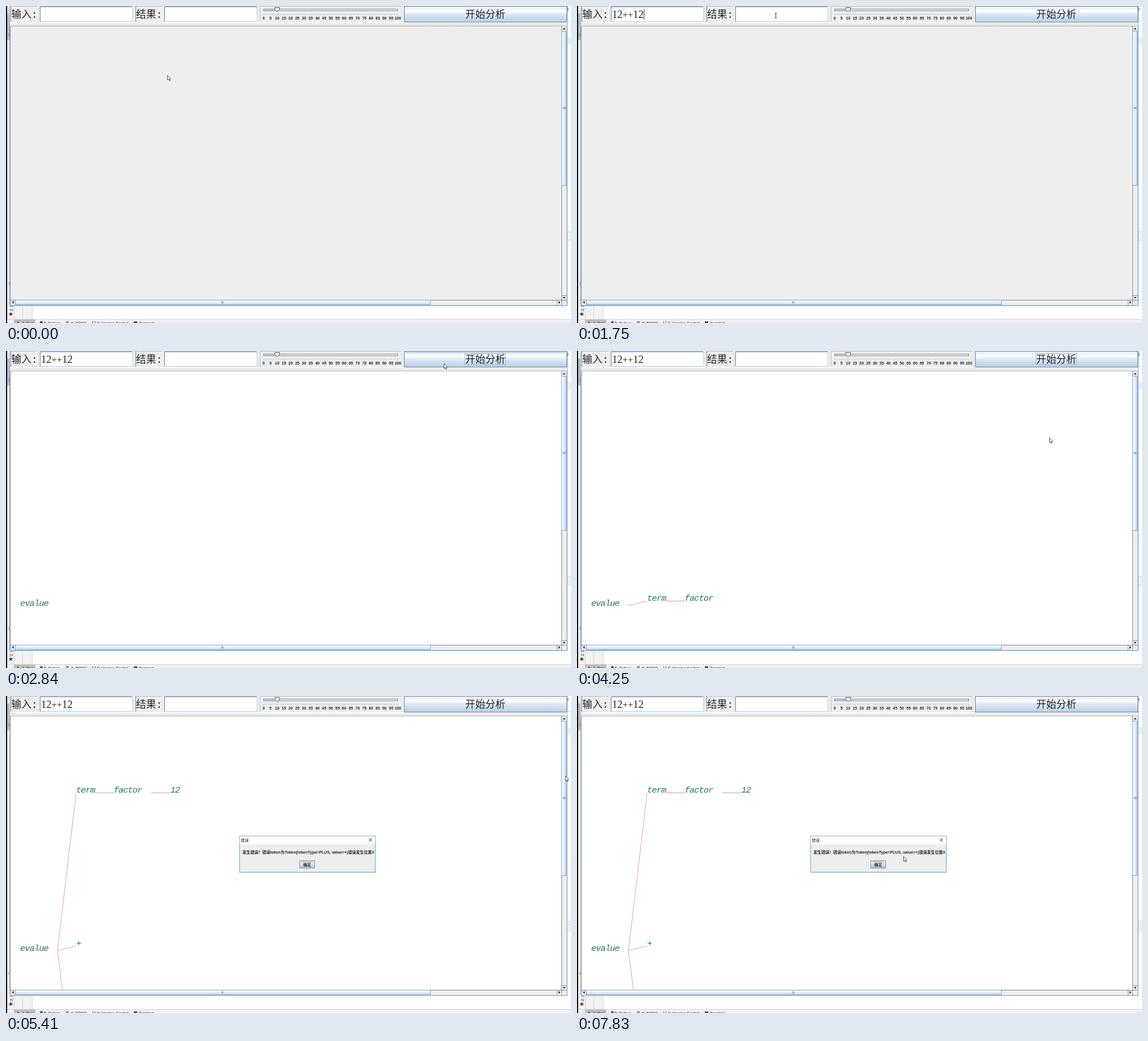
These frames come from a looping animation (999 px wide and 561 px high, 8000 ms). An HTML page:

```html
<!DOCTYPE html>
<html lang="zh">
<head>
<meta charset="utf-8">
<title>表达式分析</title>
<style>
html, body { margin: 0; width: 100%; height: 100%; overflow: hidden; background: #fff; }
svg { display: block; width: 999px; height: 561px; }
text { font-family: "Liberation Sans", "Noto Sans CJK SC", "Noto Sans CJK", sans-serif; fill: #222; white-space: pre; }
.big { font-size: 17.7px; font-family: "Liberation Mono", "Noto Sans CJK SC", "Noto Sans CJK", monospace; }
.entry { font-size: 18.6px; font-family: "Liberation Serif", serif; }
.entry tspan { font-size: 16.5px; }
.small { font-size: 7px; }
.bold { font-weight: bold; }
.mid { text-anchor: middle; }
.node text { font: italic 15.5px "Liberation Mono", monospace; letter-spacing: -1px; fill: #23785f; }
.node path { fill: none; stroke: #e3a28f; stroke-width: 1; }
.node .flat { stroke: #c9a08c; }
.steel { fill: none; stroke: #7a8a99; }
.pale { fill: none; stroke: #b5bec7; }
.thumb { stroke: #86a3d6; }
</style>
</head>
<body>
<svg id="stage" viewBox="0 0 999 561">
  <defs>
    <linearGradient id="btn" x2="0" y2="1">
      <stop offset="0" stop-color="#dde8f3"/><stop offset=".3" stop-color="#fff"/>
      <stop offset=".5" stop-color="#dde8f3"/><stop offset="1" stop-color="#b8cfe5"/>
    </linearGradient>
    <linearGradient id="barV"><stop offset="0" stop-color="#fff"/><stop offset="1" stop-color="#c8dcf0"/></linearGradient>
    <linearGradient id="barH" x2="0" y2="1"><stop offset="0" stop-color="#fff"/><stop offset="1" stop-color="#c8dcf0"/></linearGradient>
    <pattern id="bumps" width="2" height="2" patternUnits="userSpaceOnUse">
      <rect width="2" height="2" fill="#eee"/><rect width="1" height="1" fill="#fff"/>
      <rect x="1" y="1" width="1" height="1" fill="#c4ccd4"/>
    </pattern>
    <clipPath id="view"><rect x="8" y="36" width="974" height="484"/></clipPath>
  </defs>

  <g id="editor">
    <rect width="999" height="561" fill="#fff"/>
    <path d="M2 0H6V13H2ZM2 61H6V531H2Z" fill="#f4f4f4"/>
    <rect x="2" y="13" width="5" height="48" fill="#bdbdbd"/>
    <path d="M5.5 48V54M5.5 489V493" stroke="#777"/>
    <path d="M993 27.5H999M993 399.5H999M993 414.5H999" stroke="#d4d4d4"/>
    <path d="M993 3q2.500 3 0 6" fill="none" stroke="#555"/>
    <rect x="993" y="55" width="6" height="13" fill="#e3effb"/>
    <rect x="993" y="400" width="6" height="14" fill="#f0f0f0"/>
    <rect x="2" y="530" width="44" height="24" fill="#f2f2f2"/>
    <path d="M14.5 530V554M29.5 530V554M46.5 530V554" stroke="#d8d8d8"/>
    <text class="small" transform="translate(12 540) rotate(-90)">2: F</text>
    <path d="M8.5 541l1.1 2.7 2.9.2-2.2 1.8.7 2.8-2.5-1.5-2.5 1.5.7-2.8-2.2-1.8 2.9-.2Z" fill="#444"/>
    <rect x="2" y="554" width="997" height="7" fill="#f0f0f0"/>
    <path d="M2 554.5H999" stroke="#d6d6d6"/>
    <rect x="14" y="555" width="38" height="6" fill="#bdbdbd"/>
    <path d="M20 558l4 3h-4ZM60 560a2.5 2.5 0 0 1 5 0v1h-5ZM106 558h5v1h-5Zm0 2h5v1h-5ZM153 558h1v3h-1Zm4 0h1v3h-1ZM226 558h6v3h-6Z" fill="#555"/>
    <g class="small">
      <text x="28" y="563.5">4: Run</text><text x="67" y="563.5">5: Debug</text>
      <text x="115" y="563.5">6: TODO</text><text x="161" y="563.5">9: Version Control</text>
      <text x="235" y="563.5">Terminal</text>
    </g>
    <rect width="2" height="561" fill="#000"/>
  </g>

  <rect x="7" y="0" width="985" height="530" fill="#eee"/>
  <path id="frame" d="M6.5 0V530.5H992.5V0" fill="none"/>

  <g id="toolbar">
    <path d="M8.5 0V28M229.5 0V28" class="steel"/>
    <path d="M9 .5H57M230 .5H277M449 .5H699" class="pale"/>
    <path d="M56 0h4v29h-4ZM223 0h5v29h-5ZM276 0h4v29h-4ZM444 0h5v29h-5ZM699 0h5v29h-5ZM8 30H991V35H8Z" fill="url(#bumps)"/>
    <path d="M449.5 0V28" class="pale"/>
    <path d="M8 29.5H703" stroke="#fff"/>
    <text class="big" x="9.5" y="21">输入:</text>
    <text class="big" x="230" y="21">结果:</text>
    <g id="fields"></g>
    <g id="slider">
      <rect x="455.5" y="5.5" width="237" height="3" class="steel"/>
      <rect x="456" y="6" width="22" height="2" fill="#c8dbee"/>
      <path d="M475.5 2.5H483.5V6.5L479.5 10.5L475.5 6.5Z" fill="#eef4fa" stroke="#4c5a68"/>
      <g id="ticks"></g>
    </g>
    <rect id="button" x="704.5" y=".5" width="287" height="28" stroke="#7a8a99"/>
    <path id="hover" d="M706 2.5H990M706 26.5H990" stroke="#b8cfe5" stroke-width="2"/>
    <rect id="focus" x="811.5" y="4.5" width="72" height="20" fill="none" stroke="#a3b8cc"/>
    <text class="big mid" x="847.5" y="21">开始分析</text>
  </g>

  <g id="pane">
    <rect id="sheet" x="8" y="36" width="974" height="484"/>
    <path d="M8 35.5H991" stroke="#6c7884" stroke-dasharray="1 1"/>
    <path d="M7.5 36V529M982.5 36V529M8 520.5H991" class="steel"/>
    <path d="M991.5 36V529M8 529.5H991" class="pale"/>
    <path d="M983 44.5H991M983 512.5H991M16.5 521V529M974.5 521V529" class="steel"/>
    <path d="M984.5 41.5l2.5-3 2.5 3ZM984.5 515l2.5 3 2.5-3ZM13.5 522l-3 2.5 3 2.5ZM977 522l3 2.5-3 2.5Z" fill="#222"/>
    <rect x="982.5" y="44.5" width="8" height="273" fill="url(#barV)" class="thumb"/>
    <rect x="16.5" y="520.5" width="734" height="8" fill="url(#barH)" class="thumb"/>
    <path d="M984.5 179.5h5m-5 2h5M381.5 522.5v4m2-4v4" stroke="#6382bf"/>
    <g clip-path="url(#view)" id="tree"></g>
  </g>

  <text id="entry" class="entry" x="62" y="21">12<tspan>++</tspan>12</text>
  <path id="caret" d="M.5 5.5V24.5" stroke="#333"/>

  <g id="dialog">
    <rect x="413" y="248" width="240" height="64" fill="#eee" stroke="#4b9fd9"/>
    <rect x="413.5" y="248.5" width="239" height="14" fill="#fff"/>
    <text class="small" x="415" y="257.5">错误</text>
    <path d="M641.5 252l5.5 5.5m0-5.5l-5.5 5.5" stroke="#222"/>
    <text class="small bold" x="418" y="279">发生错误！错误token为Token(tokenType=PLUS, value=+)错误发生位置3</text>
    <rect x="519.5" y="291.5" width="26" height="13" fill="url(#btn)" stroke="#7a8a99"/>
    <rect x="523.5" y="293.5" width="18" height="9" fill="none" stroke="#a3b8cc"/>
    <text class="small bold mid" x="532.5" y="300.7">确定</text>
  </g>

  <circle id="click" cx="774" cy="22" r="6.5" fill="#e2e02a" fill-opacity=".75"/>
  <path id="arrow" d="M.5.5V9L2.5 7.2L3.9 10.5L5.2 9.9L3.9 6.8H6.3Z" fill="#fff" stroke="#333" stroke-width=".8"/>
  <path id="beam" d="M-2-4H2M0-4V4M-2 4H2" fill="none" stroke="#333" stroke-width=".9"/>
</svg>
<script>
const LOOP = 8000, TICK = 77.8;
const $ = id => document.getElementById(id);
const show = (id, on) => $(id).style.display = on ? "" : "none";

$("fields").innerHTML = [60, 280].map(x => `
  <rect x="${x}.5" y=".5" width="163" height="27" fill="#fff" stroke="#b8cfe5"/>
  <path d="M${x}.5 27V1.5H${x + 163}" class="steel"/>`).join("");

let ticks = "";
for (let v = 0; v <= 100; v++) {
  const x = 455.8 + v * 2.37;
  ticks += `<path d="M${x} 13.5v${v % 5 ? 2 : 3.5}" stroke="#a5afb9" stroke-width=".7"/>`;
  if (v % 5 === 0) ticks += `<text class="small bold mid" x="${x}" y="24.3">${v}</text>`;
}
$("ticks").innerHTML = ticks;

// Parse tree: label at (x, y), branches from the root, flat links between siblings
const label = (s, x, y) => `<text x="${x}" y="${y}">${s}</text>`;
const branch = y => `<path d="M91 450.5L124 ${y}"/>`;
const link = (x, y) => `<path class="flat" d="M${x} ${y}h33.5"/>`;
function tree(depth, kids) {
  const top = 442.5 - (kids - 1) * 135.5;
  let s = label("evalue", 25, 451);
  for (let i = 0; i < kids; i++) s += branch(top + i * 271);
  if (depth > 0) s += label("term", 124, top - .5);
  if (depth > 1) s += link(157, top) + label("factor", 190.5, top - .5);
  if (depth > 2) s += link(257, top) + label("12", 290.5, top - .5);
  if (kids > 1) s += label("+", 124, top + 270);
  return `<g class="node">${s}</g>`;
}
const GROWTH = [
  [0, ""], [2840, tree(0, 0)], [3390, tree(1, 1)], [3860, tree(2, 1)],
  [4330, tree(3, 1)], [4640, tree(3, 2)], [4950, tree(3, 3)]
];
let grown = "";

// Pointer stops: time, x, y
const PATH = [
  [0, 285, 122], [280, 262, 85], [560, 215, 34], [830, 190, 16], [1530, 190, 16],
  [1750, 351, 17], [1980, 520, 30], [2210, 700, 31], [2400, 774, 22], [3090, 774, 22],
  [3320, 800, 66], [3630, 833, 127], [3790, 833, 127], [4020, 835, 145], [4250, 835, 153],
  [4650, 897, 152], [5100, 960, 146], [5410, 989, 141], [5490, 985, 143], [5870, 985, 143],
  [6180, 830, 190], [6500, 590, 262], [6730, 477, 282], [7040, 473, 279], [7110, 473, 279],
  [7500, 530, 282], [7830, 577, 283.5], [8000, 577, 283.5]
];
function pointer(t) {
  const i = Math.max(1, PATH.findIndex(p => p[0] >= t));
  const [a, b] = [PATH[i - 1], PATH[i]];
  const k = (t - a[0]) / (b[0] - a[0]);
  return [1, 2].map(n => Math.round((a[n] + (b[n] - a[n]) * k) * 2) / 2);
}

function render(t) {
  // the pointer moves in even ticks
  const now = t < 50 ? 0 : Math.min(t, 50 + Math.floor((t - 50) / TICK + .2) * TICK);
  const [x, y] = pointer(now);
  const inField = y < 28 && (x > 60 && x < 223 || x > 280 && x < 444);
  show("beam", inField);
  show("arrow", !inField);
  $(inField ? "beam" : "arrow").setAttribute("transform", `translate(${x} ${y})`);

  const typed = t >= 1370, pressed = t >= 2600 && t < 2840, modal = t >= 5170;
  show("entry", typed);
  const lit = typed ? (t - 1370) % 1000 < 500 : t >= 470 && t < 970;
  show("caret", t < 2600 && lit);
  $("caret").setAttribute("transform", `translate(${typed ? 118 : 62} 0)`);

  $("button").setAttribute("fill", pressed ? "#b8cfe5" : "url(#btn)");
  show("hover", !pressed && x > 704 && x < 991 && y < 29);
  show("focus", t >= 2600 && !modal);
  show("click", pressed);
  show("dialog", modal);
  $("frame").setAttribute("stroke", modal ? "#b4c0ca" : "#78b6e6");
  $("sheet").setAttribute("fill", t >= 2840 ? "#fff" : "#eee");

  const markup = GROWTH.filter(g => g[0] <= t).pop()[1];
  if (markup !== grown) $("tree").innerHTML = grown = markup;
}

const start = performance.now();
function loop() {
  render((performance.now() - start) % LOOP);
  requestAnimationFrame(loop);
}
render(0);
requestAnimationFrame(loop);
</script>
</body>
</html>
```
